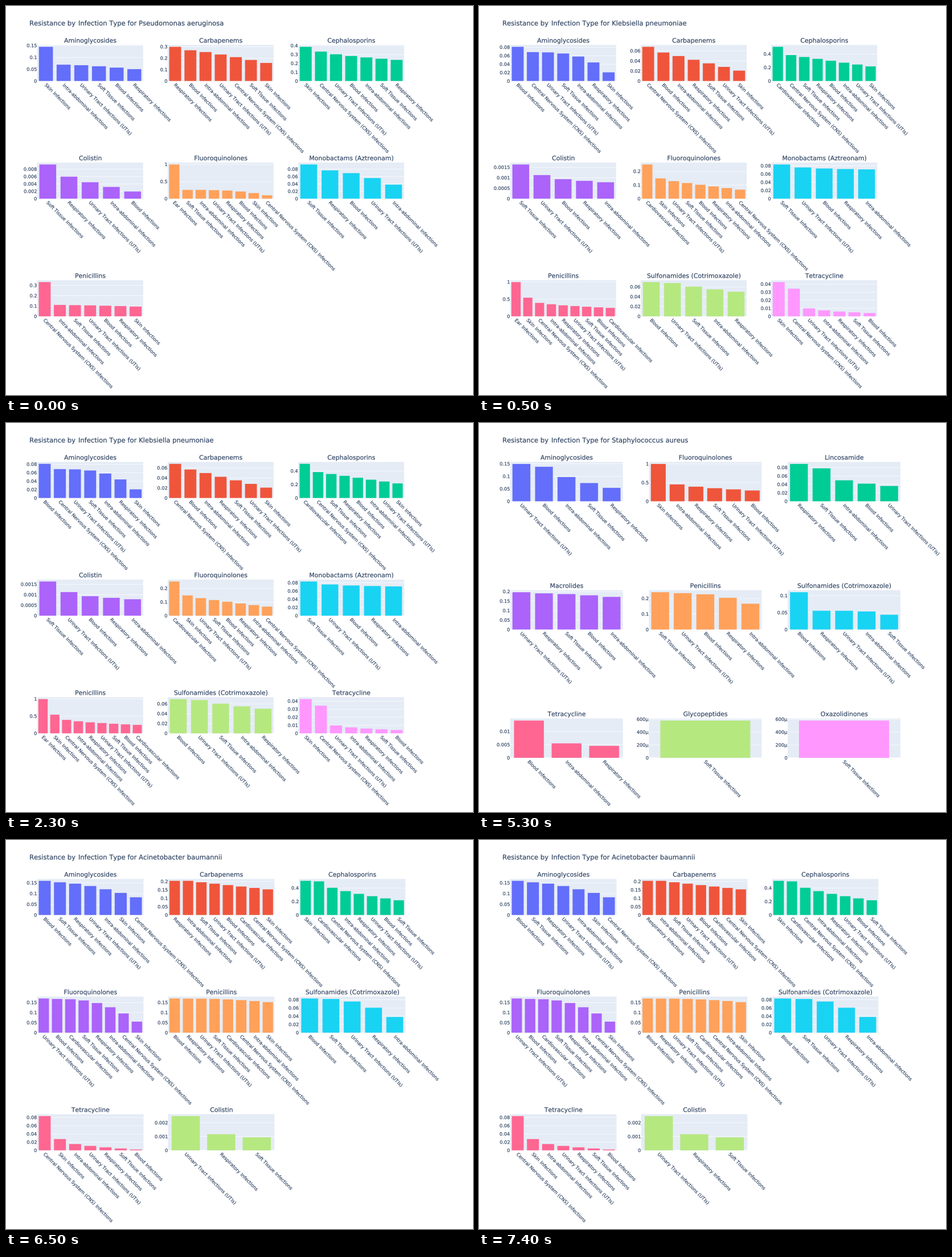
A matplotlib script for the animation above (8000 ms loop, 820 by 683 pixels).

```python
import math

import matplotlib.pyplot as plt
import numpy as np
from matplotlib.animation import FuncAnimation
from matplotlib.collections import PathCollection
from matplotlib.patches import Rectangle
from matplotlib.textpath import TextPath
from matplotlib.transforms import Affine2D

W, H, DPI = 820, 683, 64
PX = 72 / DPI                 # points per pixel
SCALE = W / 1200              # layout units to pixels
LEFT, TOP = 80 * SCALE, 100 * SCALE
TITLE, SUBTITLE, TICK = 17 * SCALE, 16 * SCALE, 12 * SCALE
HAIR = "\u200a"               # hair space, gives the narrow capital I some room
INK, PANEL = "#2a3f5f", "#e5ecf6"
COLORS = ["#636efa", "#ef553b", "#00cc96", "#ab63fa", "#ffa15a",
          "#19d3f3", "#ff6692", "#b6e880", "#ff97ff"]
KINDS = {
    "B": "Blood Infections",
    "C": "Cardiovascular Infections",
    "E": "Ear Infections",
    "I": "Intra-abdominal Infections",
    "N": "Central Nervous System (CNS) Infections",
    "R": "Respiratory Infections",
    "S": "Skin Infections",
    "T": "Soft Tissue Infections",
    "U": "Urinary Tract Infections (UTIs)",
}

plt.rcParams["text.kerning_factor"] = 6   # practically no kerning
fig = plt.figure(figsize=(W / DPI, H / DPI), dpi=DPI, facecolor="white")
ax = fig.add_axes([0, 0, 1, 1])
ax.set_xlim(0, W)
ax.set_ylim(H, 0)
ax.axis("off")


def label(text, x, y, size, align=0.0, angle=0):
    """Outline of a text whose baseline starts, centres or ends at (x, y)."""
    path = TextPath((0, 0), text.replace("I", HAIR + "I"), size=size,
                    prop={"family": "DejaVu Sans"})
    if align:
        x -= align * path.get_extents().x1
    return path.transformed(
        Affine2D().scale(1, -1).rotate_deg(angle).translate(x, y))


def nice_step(limit):
    """Smallest 2, 5 or 10 times a power of ten giving at most five steps."""
    rough = limit / 5
    power = 10.0 ** math.floor(math.log10(rough))
    return next(m * power for m in (2, 5, 10) if m * power >= rough)


def tick_text(value, step):
    if value and step < 4e-4:
        return f"{value * 1e6:g}µ"
    return f"{value:g}"


def bar_heights(count, second, last, bend):
    """Relative heights: a full first bar, then a bent slope to the last."""
    t = np.linspace(0, 1, max(count - 1, 0))
    return [1, *(second + (last - second) * t ** bend)]


class Scene:
    def __init__(self, species, right, bottom, panels):
        self.artists = []
        self.texts = [label(f"Resistance by Infection Type for {species}",
                            41, 34.2, TITLE)]
        width, height = right - LEFT, bottom - TOP
        for i, panel in enumerate(panels):
            row, col = divmod(i, 3)
            x = LEFT + col * width * (1 + 0.2 / 3) / 3
            y = TOP + row * height * 1.3 / 3
            self.panel(x, y, width * 2.6 / 9, height * 0.4 / 3,
                       COLORS[i], *panel)
        self.artists.append(ax.add_collection(PathCollection(
            self.texts, facecolor=INK, edgecolor=INK, linewidths=0.15 * PX,
            zorder=5, transform=ax.transData), autolim=False))
        self.show(False)

    def box(self, x, y, w, h, color, z, **style):
        self.artists.append(ax.add_patch(Rectangle(
            (x, y), w, h, facecolor=color, zorder=z, snap=False, **style)))

    def panel(self, x, y, w, h, color, name, kinds, peak,
              second=1, last=1, bend=1):
        self.box(x, y, w, h, PANEL, 1, linewidth=0)
        self.texts.append(label(name, x + w / 2, y - 4, SUBTITLE, 0.5))
        base, limit = y + h, peak / 0.95

        step = nice_step(limit)
        for k in range(int(limit / step) + 1):
            ty = base - h * k * step / limit
            thick = (1 if k else 2) * SCALE
            self.box(x, ty - thick / 2, w, thick, "white", 2, linewidth=0)
            self.texts.append(label(tick_text(k * step, step),
                                    x - 0.9, ty + 2.9, TICK, 1))

        slot = w / len(kinds)
        heights = bar_heights(len(kinds), second, last, bend)
        for i, (kind, ratio) in enumerate(zip(kinds, heights)):
            cx = x + (i + 0.5) * slot
            tall = 0.95 * h * ratio
            self.box(cx - 0.4 * slot, base - tall, 0.8 * slot, tall, color, 3,
                     edgecolor=PANEL, linewidth=0.5 * SCALE * PX)
            self.texts.append(label(KINDS[kind], cx - 2.9, base + 7.3,
                                    TICK, angle=45))

    def show(self, on):
        for artist in self.artists:
            artist.set_visible(on)


# Panels: name, infection kinds, peak, then second bar, last bar and bend.
pseudomonas = Scene("Pseudomonas aeruginosa", 699.2, 545, [
    ("Aminoglycosides", "SIUTBR", 0.145, 0.48, 0.35, 1.5),
    ("Carbapenems", "RBIUNTS", 0.3, 0.9, 0.53, 1.2),
    ("Cephalosporins", "SNUBITR", 0.388, 0.86, 0.62, 0.7),
    ("Colistin", "TRUIB", 0.0093, 0.645, 0.215, 0.9),
    ("Fluoroquinolones", "ETIURBSN", 1, 0.26, 0.105, 3),
    ("Monobactams (Aztreonam)", "TRBUI", 0.093, 0.83, 0.415, 1.5),
    ("Penicillins", "NITUBRS", 0.333, 0.335, 0.29, 1.5),
])

klebsiella = Scene("Klebsiella pneumoniae", 699.2, 545, [
    ("Aminoglycosides", "BNUTIRS", 0.0812, 0.845, 0.26, 3),
    ("Carbapenems", "NBIRTUS", 0.0682, 0.835, 0.31),
    ("Cephalosporins", "CNTRBIUS", 0.507, 0.76, 0.43),
    ("Colistin", "TUBRI", 0.00164, 0.69, 0.485, 0.5),
    ("Fluoroquinolones", "CSUTBRIN", 0.251, 0.595, 0.27, 0.8),
    ("Monobactams (Aztreonam)", "TUBRI", 0.0835, 0.915, 0.855, 0.6),
    ("Penicillins", "ESNIRUTBC", 1, 0.547, 0.25, 0.35),
    ("Sulfonamides (Cotrimoxazole)", "BUTIR", 0.0698, 0.975, 0.72, 0.8),
    ("Tetracycline", "SNUIRTB", 0.0426, 0.81, 0.1, 0.13),
])

staphylococcus = Scene("Staphylococcus aureus", 740, 588, [
    ("Aminoglycosides", "UBITR", 0.1497, 0.925, 0.363, 0.65),
    ("Fluoroquinolones", "SIRTUB", 1, 0.454, 0.295, 0.7),
    ("Lincosamide", "RTIBU", 0.0886, 0.885, 0.415, 0.35),
    ("Macrolides", "URTBI", 0.197, 0.97, 0.877, 1.5),
    ("Penicillins", "TUBRI", 0.2406, 0.975, 0.695, 2),
    ("Sulfonamides (Cotrimoxazole)", "BRUIT", 0.1104, 0.507, 0.4, 4),
    ("Tetracycline", "BIR", 0.0142, 0.392, 0.324),
    ("Glycopeptides", "T", 0.000582),
    ("Oxazolidinones", "T", 0.000582),
])

acinetobacter = Scene("Acinetobacter baumannii", 701.3, 545, [
    ("Aminoglycosides", "BTRUISN", 0.1597, 0.958, 0.523, 1.5),
    ("Carbapenems", "RITUBCNS", 0.2047, 1, 0.752),
    ("Cephalosporins", "SCNIRUBT", 0.507, 0.985, 0.434, 0.6),
    ("Fluoroquinolones", "UBCTRINS", 0.1706, 0.985, 0.325, 2.5),
    ("Penicillins", "BRUTCNIS", 0.1706, 0.997, 0.894, 2),
    ("Sulfonamides (Cotrimoxazole)", "BTURI", 0.0833, 0.985, 0.463, 1.8),
    ("Tetracycline", "NSIURTB", 0.0835, 0.332, 0.031, 0.45),
    ("Colistin", "URT", 0.00249, 0.474, 0.382),
])

STEP_MS = 500
SCENES = (pseudomonas, klebsiella, staphylococcus, acinetobacter)
TIMELINE = np.repeat(SCENES, [1, 6, 6, 3])


def update(frame):
    for scene in SCENES:
        scene.show(scene is TIMELINE[frame])
    return []


anim = FuncAnimation(fig, update, frames=len(TIMELINE), interval=STEP_MS,
                     init_func=lambda: update(0), repeat=True,
                     repeat_delay=0, blit=False)
plt.show()
```
